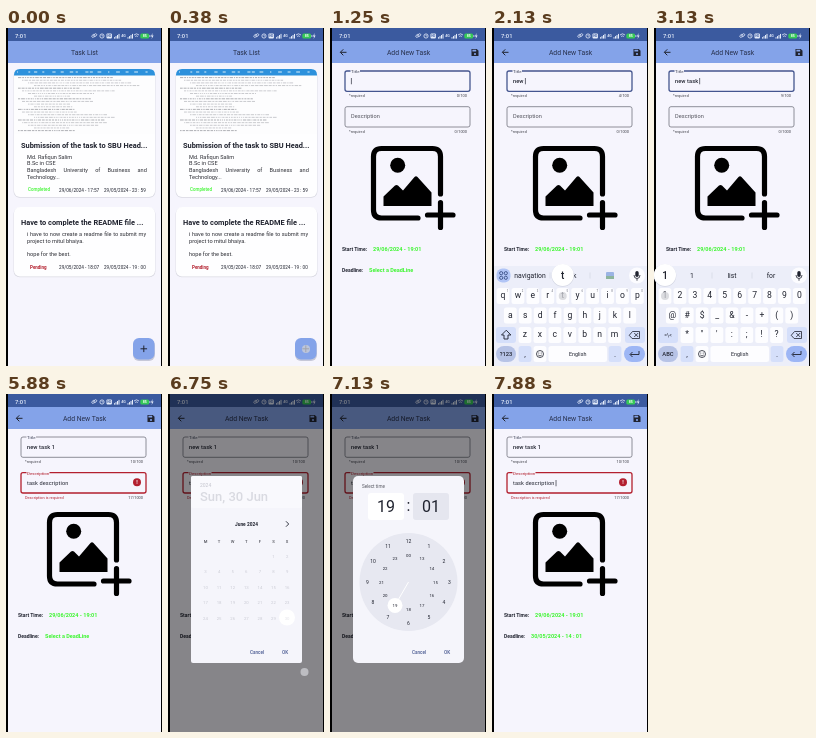
Write an HTML page that moves like this. It is 156x338 px and loops after 8000 ms.

```html
<!DOCTYPE html>
<html lang="en">
<head>
<meta charset="utf-8">
<title>Task app</title>
<style>
  html, body { margin: 0; width: 100%; height: 100%; overflow: hidden; background: #000; }
  svg { display: block; width: 100vw; height: 100vh; }
  text { font-family: Roboto, "Open Sans", sans-serif; white-space: pre; }
</style>
</head>
<body>
<svg id="stage" viewBox="0 0 156 338" preserveAspectRatio="none"></svg>
<script>
const stage = document.getElementById('stage');
const STEP = 125, STEPS = 64;
const BLUE = '#84a3e9', STATUS = '#3b5a9f', ICON = '#e6edfb', INK = '#20232f', PAGE = '#f6f5fd';
const NAVY = '#45568f', RED = '#b3202f', GREEN = '#3cf52f', KEY = '#fdfdff', SIDE_KEY = '#d5dffa';

// y is the vertical middle of the text
const text = (x, y, s, size, fill = INK, extra = '') =>
  `<text x="${x}" y="${y + size * .35}" font-size="${size}" fill="${fill}" ${extra}>${s}</text>`;
const mid = (x, y, s, size, fill, extra = '') => text(x, y, s, size, fill, `text-anchor="middle" ${extra}`);
const bold = 'font-weight="700"', medium = 'font-weight="500"';
const rect = (x, y, w, h, r, fill, extra = '') =>
  `<rect x="${x}" y="${y}" width="${w}" height="${h}" rx="${r}" fill="${fill}" ${extra}/>`;
const dot = (x, y, r, fill, extra = '') => `<circle cx="${x}" cy="${y}" r="${r}" fill="${fill}" ${extra}/>`;
const line = (d, color, w, extra = '') =>
  `<path d="${d}" fill="none" stroke="${color}" stroke-width="${w}" ${extra}/>`;
const round = 'stroke-linecap="round" stroke-linejoin="round"';
const group = (body, attrs) => `<g ${attrs}>${body}</g>`;
const touch = (x, y) => dot(x, y, 4, '#cfd0d6', 'opacity=".75"');

// last value whose step has been reached
const at = (track, f) => track.reduce((v, [from, next]) => f >= from ? next : v, track[0][1]);

const titleText = [[0, ''], [14, 'n'], [15, 'ne'], [16, 'new'], [17, 'new '], [18, 'new t'], [19, 'new ta'],
  [20, 'new tas'], [21, 'new task'], [23, 'new task '], [26, 'new task 1']];
const descText = [[0, ''], [34, 't'], [35, 'ta'], [36, 'tas'], [37, 'task'], [38, 'task '], [39, 'task d'],
  [40, 'task de'], [41, 'task des'], [42, 'task desc'], [43, 'task description ']];
const hints = [[0, 'I the and'], [14, 'n no new'], [16, 'new news newest'], [17, 'navigation task'], [18, 't task the'],
  [23, '1 list for'], [30, 'I the and'], [34, 't the then'], [35, 'ta task take'], [37, 'task tasks tasked'],
  [38, 'is and for'], [39, 'd do did'], [41, 'des description desk']];
const pressed = { 13: 'n', 14: 'e', 15: 'w', 17: 't', 18: 'a', 19: 's', 20: 'k', 25: '1', 33: 't', 35: 'a', 36: 's',
  37: 'k', 39: 'd', 40: 'e', 41: 's', 42: 'c' };
const keyboardDrop = [[0, 100], [11, 60], [12, 15], [13, 0], [44, 30], [45, 75], [46, 100]];
const letters = ['qwertyuiop', 'asdfghjkl', 'zxcvbnm'];
const symbols = ['1234567890', '@#$_&-+()', '*"\':;!?'];

function statusBar() {
  const bars = x => [0, 1, 2, 3].map(i => rect(x + i * 1.5, 9.2 - i * 1.1, 1, 1.4 + i * 1.1, 0, ICON)).join('');
  return rect(2, 0, 153, 13, 0, STATUS) + text(9, 8, '7:01', 5.8, ICON, medium)
    + rect(85.6, 7, 3.4, 2.2, 1.1, 'none', `stroke="${ICON}" stroke-width=".7" transform="rotate(-40 87 8)"`)
    + rect(88, 6.4, 3.4, 2.2, 1.1, 'none', `stroke="${ICON}" stroke-width=".7" transform="rotate(-40 89 8)"`)
    + dot(96, 8, 2.1, 'none', `stroke="${ICON}" stroke-width=".8"`) + line('M96 6.8V8h1.1', ICON, .6)
    + rect(100.5, 5.4, 5.4, 5.2, 1, ICON) + mid(103.2, 8, 'HD', 3, STATUS, bold)
    + bars(108) + mid(117.5, 8, '4G', 3.6, ICON, bold) + bars(121.5)
    + line('M128 7q2.5-2.4 5 0M129.2 8.5q1.3-1.2 2.6 0', ICON, .8)
    + rect(134.3, 5.4, 8.8, 5.2, 1.5, '#35c957') + rect(143.5, 7, .8, 2, .3, ICON)
    + mid(138.7, 8, '85', 3.6, '#fff', bold)
    + `<path d="M146.5 5l-1.6 3.4h1.2l-.5 2.6 2-3.5h-1.3z" fill="${ICON}"/>`;
}

const appBar = title => rect(2, 0, 153, 35, 0, BLUE) + statusBar() + mid(78.5, 24.3, title, 6.8, '#27304c');

// pale document page with small word dashes
function thumbnail() {
  let seed = 7, out = rect(8, 41, 141, 65, 0, '#fdfdfe') + rect(8, 41, 141, 6.5, 0, '#2d91dc');
  const rnd = () => (seed = seed * 16807 % 2147483647) / 2147483647;
  for (let x = 11; x < 142; x += 4 + rnd() * 8) out += rect(x, 43.3, 1 + rnd() * 3, 1.4, 0, '#a9d3f0');
  for (let row = 0; row < 21; row++) {
    const y = 49.6 + row * 2.65, indent = [0, 4, 10, 16][row % 4];
    const end = row < 4 ? 105 + row * 9 : 50 + rnd() * 62;
    let d = '';
    for (let x = 12 + indent; x < end;) {
      const w = .8 + rnd() * 3;
      d += `M${x.toFixed(1)} ${y}h${w.toFixed(1)}`;
      x += w + .9;
    }
    out += line(d, row % 4 ? '#b4b5ba' : '#8f9097', .7);
  }
  return out;
}

function card(y, h, body) {
  return rect(7.6, y + .8, 141.8, h, 6, '#d9d9e2') + rect(8, y, 141, h, 6, '#fefeff') + body;
}

function listPage(tap) {
  const dates = (y, a, b) => text(53, y, a, 4.7) + text(98, y, b, 4.6);
  const body = (y, s, gap = 0) => text(21, y, s, 5.6, '#2c2d34', `word-spacing="${gap}"`);
  return rect(2, 0, 153, 338, 0, PAGE) + appBar('Task List')
    + card(41, 128, group(thumbnail(), 'clip-path="url(#cardTop)"')
      + text(15, 117, 'Submission of the task to SBU Head...', 7.4, INK, bold)
      + body(128.7, 'Md. Rafiqun Salim') + body(135.5, 'B.Sc in CSE')
      + body(142.4, 'Bangladesh University of Business and', 5.9) + body(149.2, 'Technology...')
      + text(22, 161.9, 'Completed', 4.5, GREEN, medium) + dates(161.9, '29/06/2024 - 17:57', '29/05/2024 - 23 : 59'))
    + card(179, 69.500, text(15, 194, 'Have to complete the README file ...', 7.4, INK, bold)
      + body(205.8, 'i have to now create a readme file to submit my', .2)
      + body(212.6, 'project to mitul bhaiya.') + body(226, 'hope for the best.')
      + text(24, 239, 'Pending', 4.5, RED, bold) + dates(239, '29/05/2024 - 18:07', '29/05/2024 - 19 : 00'))
    + rect(127, 311.5, 22, 21.5, 6, '#c6c8d8') + rect(127, 310, 21.5, 21.5, 6, BLUE)
    + line('M134.500 320.800h6.600M137.800 317.500v6.600', INK, 1)
    + (tap ? touch(138, 321) : '');
}

function field(y, o) {
  const color = o.error ? RED : o.focus ? NAVY : '#74757f';
  const floats = o.focus || o.value;
  const caret = o.caret ? `<tspan fill="${INK}" font-size="8" font-weight="500" dx="-.8" dy=".4">|</tspan>` : '';
  return rect(15, y, 125, 20.3, 2, 'none', `stroke="${color}" stroke-width="${o.focus ? 1.3 : .8}"`)
    + (floats ? rect(20.5, y - 1, o.labelWidth, 2, 0, PAGE) + text(21, y + .6, o.label, 4.4, o.error ? RED : '#3c4054')
      : text(21, y + 9.8, o.label, 5.6, '#50515a', 'letter-spacing=".05"'))
    + text(21, y + 10, o.value + caret, 5.6, INK, `letter-spacing=".1" font-weight="${o.weight}"`)
    + (o.error ? dot(131, y + 9.5, 4, RED) + mid(131, y + 9.5, '!', 5.5, '#fff', bold) : '')
    + text(19, y + 24.7, o.error ? 'Description is required' : '*required', 3.9, o.error ? RED : '#44454d')
    + text(137, y + 24.7, `${o.value.length}/${o.max}`, 3.9, '#44454d', 'text-anchor="end"');
}

function pictureIcon() {
  return line('M88 190H51.5Q43.5 190 43.5 182V128.5Q43.5 120.5 51.5 120.5H102.5Q110.5 120.5 110.5 128.5V166', '#000', 5.2, 'stroke-linecap="round"')
    + dot(67.7, 137.3, 7.5, '#000')
    + '<path d="M53.5 178V168.5L65 157.5Q66.5 156.300 68 157.5L73 162.5L84.5 149Q86 147.5 87.5 149L101.5 164.5V178Z"/>'
    + line('M97.5 187H123M110.5 174.5V199.5', '#000', 5.2, 'stroke-linecap="round"');
}

function formPage(f) {
  const describing = f >= 30;
  const solid = f < 46 || f > 60;
  return rect(2, 0, 153, 338, 0, PAGE) + appBar('Add New Task')
    + line('M16.5 24.3H10.5M13.3 21.3L10.3 24.3L13.3 27.3', INK, 1)
    + `<path d="M141.5 21h5.3l1.7 1.7v5.3h-7z" fill="${INK}"/>`
    + rect(142.4, 21.7, 3.8, 1.8, 0, BLUE) + dot(145, 26, 1.1, BLUE)
    + (f === 27 ? touch(145, 24.3) : '')
    + field(43, { label: 'Title', labelWidth: 9.5, max: 100, weight: 500, value: at(titleText, f),
      focus: f >= 8 && !describing, caret: f >= 8 && !describing })
    + field(78.7, { label: 'Description', labelWidth: 23, max: 1000, weight: 400, value: at(descText, f),
      error: f >= 28, focus: describing, caret: describing && solid })
    + pictureIcon()
    + text(12, 221.2, 'Start Time:', 5, INK, bold) + text(43, 221.2, '29/06/2024 - 19:01', 5.5, GREEN, bold)
    + text(12, 242, 'Deadline:', 5, INK, bold)
    + text(39, 242, f >= 61 ? '30/05/2024 - 14 : 01' : 'Select a DeadLine', 5.5, GREEN, bold)
    + (f === 49 ? touch(62, 242) : '');
}

function keyboard(f) {
  const onSymbols = f >= 24 && f < 31;
  const finger = pressed[f] || pressed[f + 1];
  const words = at(hints, f).split(' ');
  let out = rect(2, 238, 153, 100, 0, '#eceef9'), popup = '';
  out += rect(4.5, 240.5, 14, 14, 6, '#b1c5f6');
  for (const x of [9.2, 13.8]) for (const y of [245.2, 249.8]) out += dot(x, y, 1.6, 'none', 'stroke="#2f457c" stroke-width=".8"');
  words.forEach((w, i) => out += mid([38, 78, 117][i], 247.3, w, 6.8, INK));
  if (words.length < 3) out += rect(114, 244, 8, 7, 1, '#9bb4e4') + rect(114, 248, 8, 3, 0, '#8db59d');
  out += line('M58 244.5v6M98 244.5v6', '#c9ccda', .5) + dot(145, 247.5, 8, '#fcfcff');
  out += rect(143.3, 243, 3.4, 6, 1.7, INK) + line('M142 247q0 3.5 3 3.5t3-3.5M145 250.5v2.2', INK, .8);

  (onSymbols ? symbols : letters).forEach((row, r) => {
    const y = 268 + r * 19.5;
    [...row].forEach((k, i) => {
      const x = [11, 18.3, 33][r] + i * 14.93;
      const label = k === '&' ? '&amp;' : k;
      out += rect(x - 6.4, y - 8, 12.8, 16, 2.5, KEY) + mid(x, y - .8, label, 8.6, INK);
      if (r === 0 && !onSymbols) out += mid(x + 4.6, y - 5, (i + 1) % 10, 2.8, '#666a78');
      if (k === finger) popup += touch(x, y);
      if (k === pressed[f])
        popup += dot(x, y - 20.5, 11.3, '#d3d6e3') + dot(x, y - 21, 11, '#fff') + mid(x, y - 21, label, 10, INK, medium);
    });
  });

  out += rect(4, 299, 20, 16, 3, SIDE_KEY) + rect(133, 299, 20, 16, 3, SIDE_KEY);
  out += onSymbols ? mid(14, 307, '=\\&lt;', 5, INK) : line('M14 302.5L9.5 307H12V311H16V307H18.5Z', INK, .9, round);
  out += line('M137.5 307l3-3.5h7v7h-7zM142.5 305.3l3.4 3.4M145.900 305.3l-3.4 3.4', INK, .8, round);
  out += rect(4, 318, 20, 16, 8, '#b7c3e6') + mid(14, 326, onSymbols ? 'ABC' : '?123', 5.8, INK, medium);
  for (const [x, k] of [[33, ','], [123, '.']]) out += rect(x - 6.4, 318, 12.8, 16, 2.5, SIDE_KEY) + mid(x, 326, k, 8, INK);
  out += rect(41.6, 318, 12.8, 16, 2.5, KEY) + dot(48, 326, 3.5, 'none', `stroke="${INK}" stroke-width=".8"`)
    + dot(46.8, 325, .5, INK) + dot(49.2, 325, .5, INK) + line('M46.2 327q1.8 1.8 3.6 0', INK, .7);
  out += rect(56.5, 318, 58.5, 16, 2.5, KEY) + mid(85.7, 326, 'English', 5.4, INK) + (f === 22 ? touch(85, 326) : '');
  out += rect(132, 318, 21, 16, 8, '#9db6f5') + line('M147 323v3.5h-8.5M140.5 324l-2.5 2.5 2.5 2.5', INK, .9);
  return out + popup;
}

const buttons = text(82, 258, 'Cancel', 4.6, NAVY, medium) + text(114, 258, 'OK', 4.6, NAVY, medium);

function datePicker(f) {
  let out = rect(23, 82, 111, 187, 2, '#f5f5fb') + rect(23, 82, 111, 32, 2, '#f9f9fd')
    + text(32, 91.5, '2024', 5, '#c3c4cd') + text(32, 102, 'Sun, 30 Jun', 13, '#d9dae1', medium)
    + mid(78.5, 130, 'June 2024', 4.8, INK, bold) + line('M118 127.3l2.7 2.7-2.7 2.7', INK, .9);
  const col = i => 37.5 + i * 13.6;
  [...'MTWTFSS'].forEach((d, i) => out += mid(col(i), 148, d, 4.2, '#55565f', medium));
  out += dot(119, 223.5, 8, '#fff');
  for (let day = 1; day <= 30; day++) {
    const cell = day + 4;
    out += mid(col(cell % 7), 162.5 + Math.floor(cell / 7) * 15.4, day, 4.3, day === 30 ? '#e4e4ea' : '#cbccd5');
  }
  return out + buttons + (f > 52 && f < 56 ? touch(136.5, 278) : '');
}

function timePicker(f) {
  const hour = f < 59 ? 19 : 14;
  let out = rect(23, 82, 111, 187, 5, '#f5f5fb') + text(32, 92, 'Select time', 4.6, '#55565f')
    + rect(38, 99, 36, 27, 3, '#fff') + rect(83, 99, 36, 27, 3, '#e5e6ef')
    + mid(56, 112.5, hour, 16, INK) + mid(78.5, 111, ':', 16, INK) + mid(101, 112.5, '01', 16, INK)
    + dot(78.5, 188, 49, '#e7e8f1');
  const spot = (n, r) => [78.5 + r * Math.sin(n * Math.PI / 6), 188 - r * Math.cos(n * Math.PI / 6)];
  const [hx, hy] = spot(hour, 27);
  out += line(`M78.5 188L${hx} ${hy}`, '#fff', 1) + dot(hx, hy, 7.5, '#fff');
  for (let n = 0; n < 12; n++) {
    out += mid(...spot(n, 41), n || 12, 5, INK) + mid(...spot(n, 27), n ? n + 12 : '00', 4.4, INK);
  }
  return out + buttons;
}

const shade = [[0, 0], [50, .5], [51, 1], [61, .4], [62, 0]];
const defs = '<defs><clipPath id="cardTop"><path d="M8 106V47q0-6 6-6H143q6 0 6 6V106Z"/></clipPath></defs>';

function draw(f) {
  let out = defs + rect(0, 0, 156, 338, 0, '#000');
  if (f < 6) out += listPage(f === 2 || f === 3);
  const enter = at([[0, 0], [4, .35], [5, .75], [6, 1]], f);
  if (enter) out += group(formPage(f), `opacity="${enter}"`);
  const drop = at(keyboardDrop, f);
  if (drop < 100) out += group(keyboard(f), `transform="translate(0 ${drop})"`);
  const dark = at(shade, f);
  if (dark) out += rect(2, 0, 153, 338, 0, '#000', `opacity="${dark * .46}"`)
    + group(f < 57 ? datePicker(f) : timePicker(f), `opacity="${dark}"`);
  stage.innerHTML = out;
}

let shown = -1;
const start = performance.now();
function tick(now) {
  const f = Math.floor(Math.max(0, now - start) / STEP) % STEPS;
  if (f !== shown) draw(shown = f);
  requestAnimationFrame(tick);
}
tick(start);
</script>
</body>
</html>
```
